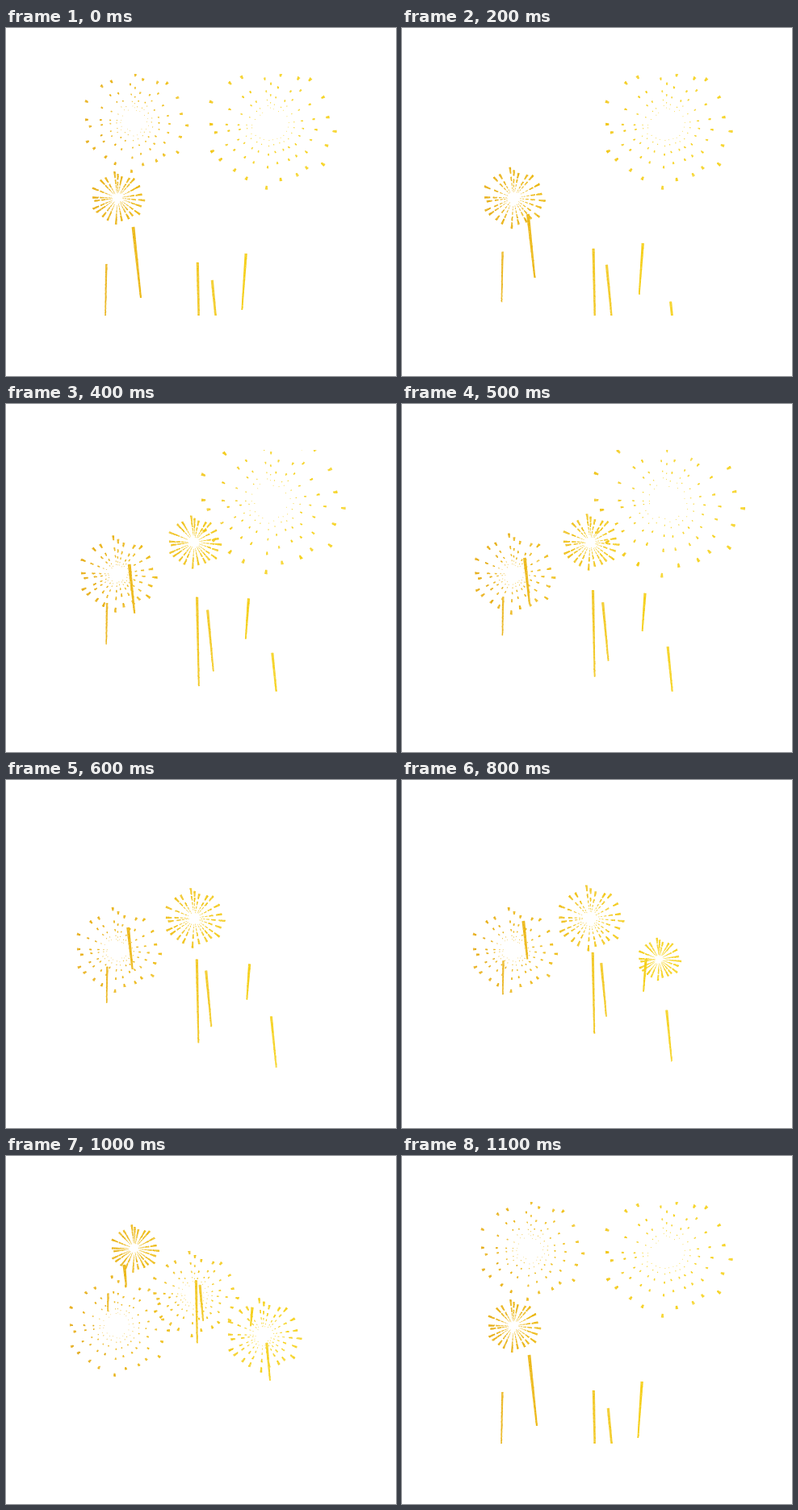
Write an HTML page with a canvas that moves like this. It is 483 px wide and 432 px high and loops after 1.2 s.

```html
<!DOCTYPE html>
<html lang="en">
<head>
<meta charset="utf-8">
<title>Fireworks</title>
<style>
  html, body { margin: 0; width: 100%; height: 100%; overflow: hidden; background: #fff; }
  canvas { display: block; }
</style>
</head>
<body>
<canvas id="sky" width="483" height="432"></canvas>
<script>
const ctx = document.getElementById('sky').getContext('2d');
const STEP = 100, LOOP = 1200;
const TOP = 57, BOTTOM = 357;

// Flight progress at each step; the last step repeats the first.
const PROGRESS = [0, 1, 2, 4, 6, 7, 8, 8.5, 9, 12.5, 16, 0];

// Ray tips of one burst, relative to its centre.
const TIPS = [
  [-6, -53], [1, -48], [9, -43], [24, -40], [34, -39], [45, -24], [49, -7], [55, 5],
  [48, 17], [45, 33], [31, 36], [23, 42], [9, 46], [-3, 53], [-20, 45], [-30, 38],
  [-42, 29], [-49, 22], [-46, 6], [-50, -1], [-50, -20], [-34, -36], [-24, -41]
];
const RINGS = [1, .71, .51, .37, .28, .22];
const WIDTHS = [3.1, 2.1, 1.5, 1.1, .8];

// Scale of each burst per step; 0 means unlit.
const BURSTS = [
  { x: 159, y: 115, scale: [1.22, 1.22, 0, 0, 0, 0, 0, 0, 0, 0, .56] },
  { x: 327, y: 121, scale: [1.5, 1.5, 1.5, 1.6, 1.7, 1.78, 0, 0, 0, 0, 0] },
  { x: 138, y: 211, scale: [.62, .66, .72, .81, .9, .95, 1, 1, 1, 1.09, 1.18] },
  { x: 233, y: 171.5, scale: [0, 0, 0, .54, .62, .66, .7, .73, .77, .89, 1.01] },
  { x: 318.5, y: 222.5, scale: [0, 0, 0, 0, 0, 0, 0, 0, .5, .68, .87] }
];

// Head and tail: start point and velocity per unit of progress.
const ROCKETS = [
  { head: [124.3, 293, .13, -7.65], tail: [123, 361, .2, -10.5], w: 2.5 },
  { head: [157.5, 247, -.8, -8], tail: [167, 335, -1.3, -12.5], w: 3.8, until: 14 },
  { head: [237.3, 291, -.12, -8.55], tail: [240, 421, -.2, -11.8], w: 3.2 },
  { head: [255.3, 313, -.95, -9.55], tail: [264.5, 408, -1.27, -12.7], w: 3.2 },
  { head: [297.2, 280, .55, -6.45], tail: [292.3, 350, .75, -9.7], w: 3.2, until: 14.3 },
  { head: [334, 355, -.7, -7.7], tail: [343, 440, -1, -10.1], w: 3.1, from: 1 }
];

function random(seed) {
  let s = (seed * 2654435761) >>> 0;
  return () => {
    s = (s + 0x6D2B79F5) >>> 0;
    let t = Math.imul(s ^ (s >>> 15), s | 1);
    t ^= t + Math.imul(t ^ (t >>> 7), t | 61);
    return ((t ^ (t >>> 14)) >>> 0) / 4294967296;
  };
}

// Gold turns from amber on the left to yellow on the right.
function gold(x, shade) {
  const p = Math.min(1, Math.max(0, (x - 80) / 230));
  return `hsl(${43 + 7 * p} ${82 + 10 * p}% ${45 + 5 * p + 15 * shade}%)`;
}

// A tapered stroke with a glittering grain.
function streak(x1, y1, x2, y2, w1, w2, rnd) {
  const dx = x2 - x1, dy = y2 - y1, len = Math.hypot(dx, dy) || 1;
  const nx = -dy / len / 2, ny = dx / len / 2;
  ctx.fillStyle = gold(x1, .2 + .65 * rnd());
  ctx.beginPath();
  ctx.moveTo(x1 + nx * w1, y1 + ny * w1);
  ctx.lineTo(x2 + nx * w2, y2 + ny * w2);
  ctx.lineTo(x2 - nx * w2, y2 - ny * w2);
  ctx.lineTo(x1 - nx * w1, y1 - ny * w1);
  ctx.fill();
  if (w1 < 1.4) return;
  for (let d = .5; d < len; d += 1.4) {
    const p = d / len, side = (rnd() - .5) * (w1 + (w2 - w1) * p) * 1.3;
    ctx.fillStyle = gold(x1, rnd() * 1.2);
    ctx.fillRect(x1 + dx * p + nx * side - .6, y1 + dy * p + ny * side - .6, 1.2, 1.2);
  }
}

function drawBurst({ x, y }, k, seed) {
  if (!k) return;
  const rnd = random(seed);
  const fill = Math.max(.2, 1 - 1.5 * (k - .52));
  const size = .62 + .36 * Math.min(k, 1.5);
  for (const [tx, ty] of TIPS) {
    const drift = (rnd() - .5) * .1;
    WIDTHS.forEach((w, i) => {
      const shift = i ? drift : 0;
      const outer = RINGS[i] + shift;
      const inner = outer - (RINGS[i] - RINGS[i + 1]) * Math.min(.95, fill);
      streak(x + tx * k * outer, y + ty * k * outer,
             x + tx * k * inner, y + ty * k * inner,
             w * size, w * size * .6, rnd);
    });
  }
}

function drawRocket({ head, tail, w, until = 99, from = 0 }, t, seed) {
  if (t < from) return;
  t = Math.min(t, until);
  const at = ([x, y, vx, vy]) => [x + vx * t, y + vy * t];
  streak(...at(head), ...at(tail), w, w * .55, random(seed));
}

function draw(now) {
  const step = Math.floor((now % LOOP) / STEP) % 11;
  ctx.clearRect(0, 0, 483, 432);
  ctx.save();
  ctx.beginPath();
  ctx.rect(0, TOP, 483, BOTTOM - TOP);
  ctx.clip();
  BURSTS.forEach((b, i) => drawBurst(b, b.scale[step], i + 1));
  ROCKETS.forEach((r, i) => drawRocket(r, PROGRESS[step], i + 11));
  ctx.restore();
}

const start = performance.now();
function tick() {
  draw(performance.now() - start);
  requestAnimationFrame(tick);
}
tick();
</script>
</body>
</html>
```
